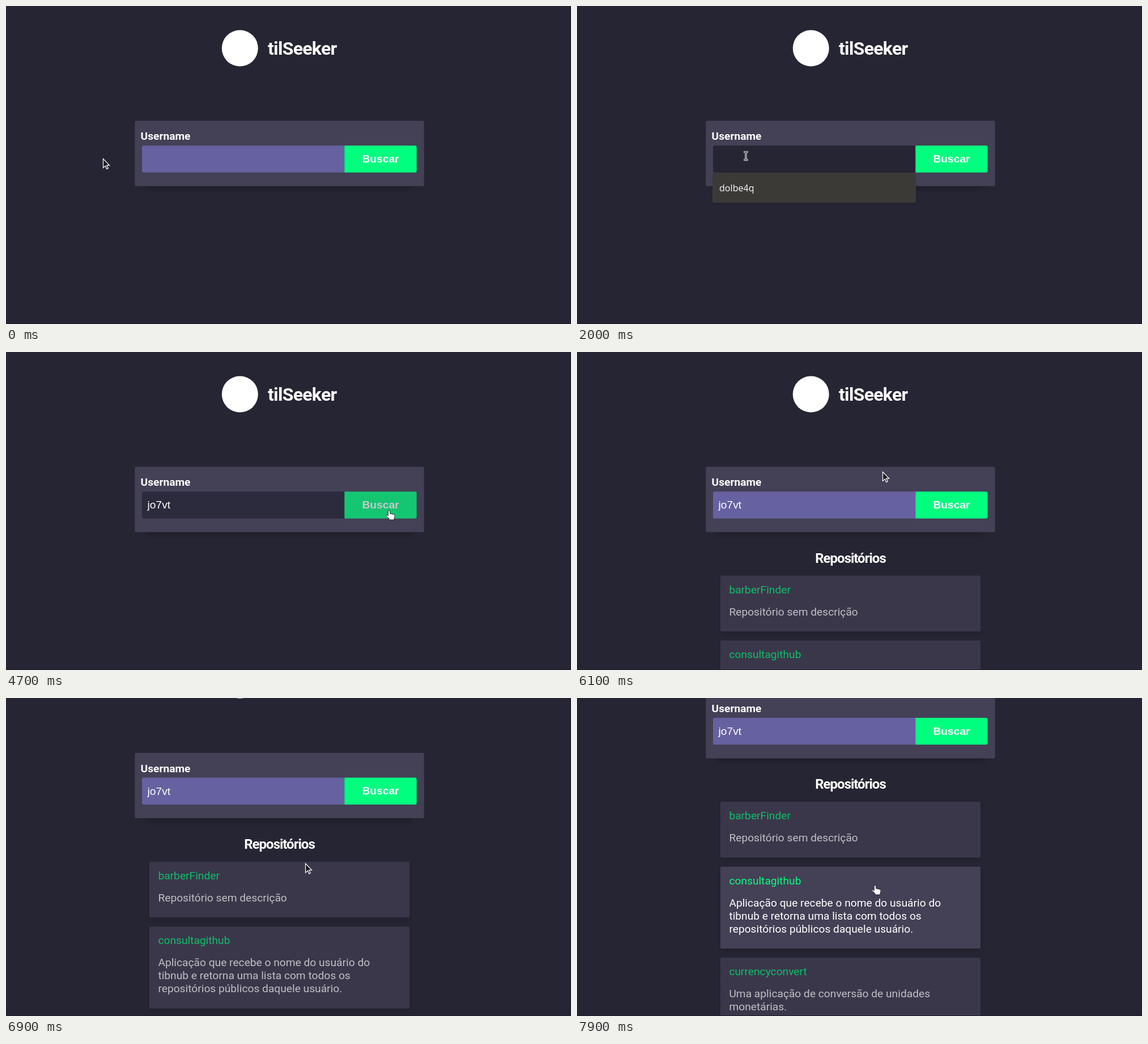
Animation, 997 px wide and 561 px high, one loop 8000 ms. Source, as an HTML page:

```html
<!DOCTYPE html>
<html lang="pt-BR">
<head>
<meta charset="utf-8">
<title>Busca de repositórios</title>
<style>
  html, body { margin: 0; width: 100%; height: 100%; overflow: hidden; background: #262533; }
  svg { display: block; width: 997px; height: 561px; }
  text { fill: #fff; font: 19.2px Roboto, sans-serif; white-space: pre; }
  .brand { font-size: 32px; font-weight: 700; letter-spacing: -.7px; }
  .heading { font-size: 24px; font-weight: 700; letter-spacing: -1px; text-anchor: middle; }
  .label { font-weight: 700; }
  .field { font-family: "Liberation Sans", Arial, sans-serif; }
  .button { font-family: "Liberation Sans", Arial, sans-serif; font-weight: 700; text-anchor: middle; }
  .option { font: 16px "Noto Sans", sans-serif; fill: #eee; }
  .name { fill: #00ff7f; }
  .panel { fill: #444056; }
  .shadow { fill: #000; filter: blur(5px); }
</style>
</head>
<body>
<svg viewBox="0 0 997 561">
  <rect width="997" height="561" fill="#262533"/>
  <g id="page">
    <circle cx="412.8" cy="74.5" r="32" fill="#fff"/>
    <text class="brand" x="462" y="86">tilSeeker</text>

    <rect class="shadow" x="248" y="300" width="469" height="23" opacity=".22"/>
    <rect class="panel" x="227.3" y="202.5" width="510.4" height="115.3" rx="2.5"/>
    <text class="label" x="237.6" y="236.3">Username</text>
    <path id="input" d="M597.3 246.3H243q-3 0-3 3v41.4q0 3 3 3H597.3Z"/>
    <text id="typed" class="field" x="249.6" y="276.3"></text>
    <g id="button">
      <path d="M597.3 246.3h124.3q3 0 3 3v41.4q0 3-3 3H597.3Z" fill="#00ff7f"/>
      <text class="button" x="661" y="276">Buscar</text>
    </g>

    <g id="results">
      <text class="heading" x="482.5" y="371.5">Repositórios</text>
    </g>
  </g>

  <g id="dropdown">
    <rect class="shadow" x="243" y="300" width="351" height="46" opacity=".15"/>
    <path d="M239 294H598v49q0 4-4 4H243q-4 0-4-4Z" fill="#3b3a37"/>
    <text class="option" x="251" y="326.5">dolbe4q</text>
  </g>

  <path d="M0 560.5H996.5V0" fill="none" stroke="#1b1a25"/>

  <g id="cursor">
    <path id="arrow" d="M.5 .5V16.6L4.3 13.1L6.8 18.6L9.2 17.5L6.8 12.1H11.6Z"
          fill="#1c1b22" stroke="#fff" stroke-width="1.2"/>
    <g id="beam" fill="none">
      <path id="stem" d="M-4-6.5H-1.5L0-5.5L1.5-6.5H4M0-6V7M-4 7.5H-1.5L0 6.5L1.5 7.5H4" stroke="#fff" stroke-width="3"/>
      <path d="M-4-6.5H4M0-6V7M-4 7.5H4" stroke="#1c1b22"/>
    </g>
    <path id="hand" d="M-1.7 1.5Q-1.7 0 0 0T1.7 1.5V5.5L8 7Q10.3 7.7 10.2 10L9 14V16.5H0V14.5L-5.3 9.5Q-5.6 7.3-3.5 7.8L-1.7 9.3Z"
          fill="#fff" stroke="#1c1b22" stroke-width=".9"/>
  </g>
</svg>
<script>
const DURATION = 8000;
const STEP = 100;
const USER = "jo7vt";
const NOTCH = 105.7;
const DIMMED = .7;
const IDLE_FILL = [102, 97, 161];
const FOCUS_FILL = [38, 37, 51];

const REPOS = [
  ["barberFinder", "Repositório sem descrição"],
  ["consultagithub", "Aplicação que recebe o nome do usuário do",
    "tibnub e retorna uma lista com todos os", "repositórios públicos daquele usuário."],
  ["currencyconvert", "Uma aplicação de conversão de unidades", "monetárias."]
];

const HOME = { x: 171, y: 269 };
const MOVES = [
  { at: 500, lasts: 500, x: 298, y: 264 },
  { at: 4400, lasts: 300, x: 676, y: 279.5 },
  { at: 5100, lasts: 200, x: 539, y: 211 },
  { at: 6100, lasts: 400, x: 528, y: 291.5 },
  { at: 7100, lasts: 300, x: 526, y: 323 },
  { at: 7700, lasts: 200, x: 526, y: 330.5 }
];

const $ = id => document.getElementById(id);
const ramp = (time, at, lasts) => Math.min(1, Math.max(0, (time - at) / lasts));
const pulse = (time, on, off, lasts) => ramp(time, on, lasts) - ramp(time, off, lasts);
const easeIn = p => p ** 1.3;
const easeOut = p => 1 - (1 - p) ** 2;
const mix = (a, b, p) => a + (b - a) * p;
const show = (id, visible) => $(id).style.display = visible ? "" : "none";

function add(parent, tag, attrs, text = "") {
  const node = document.createElementNS("http://www.w3.org/2000/svg", tag);
  for (const key in attrs) node.setAttribute(key, attrs[key]);
  node.textContent = text;
  return parent.appendChild(node);
}

let cardTop = 394.5;
const cards = REPOS.map(([name, ...lines]) => {
  const height = 75.5 + 23 * lines.length;
  const card = add($("results"), "g", {});
  add(card, "rect", { class: "shadow", x: 256, y: cardTop + 6, width: 453, height: height - 4, opacity: .25 });
  add(card, "rect", { class: "panel", x: 253, y: cardTop, width: 459, height, rx: 2.5 });
  add(card, "text", { class: "name", x: 268.4, y: cardTop + 31 }, name);
  lines.forEach((line, i) => add(card, "text", { x: 268.4, y: cardTop + 70 + 23 * i }, line));
  cardTop += height + 16;
  return card;
});

function cursorAt(time) {
  return MOVES.reduce((from, to) => {
    const p = easeOut(ramp(time, to.at, to.lasts));
    return { x: mix(from.x, to.x, p), y: mix(from.y, to.y, p) };
  }, HOME);
}

function cursorShape(time) {
  if (time >= 2100 && time < 4300) return "hidden";
  if (time >= 800 && time < 4600) return "beam";
  if (time >= 4600 && time < 5200 || time >= 7200) return "hand";
  return "arrow";
}

// Steady typing with one pause after the third key
function typedCount(time) {
  const elapsed = time - 2100;
  const keys = Math.floor(elapsed / 300) + 1;
  return Math.max(0, keys <= 3 ? keys : Math.max(3, Math.floor((elapsed - 400) / 300) + 1));
}

function render(time) {
  const { x, y } = cursorAt(time);
  const shape = cursorShape(time);
  $("cursor").setAttribute("transform", `translate(${x} ${y})`);
  for (const id of ["arrow", "beam", "hand"]) show(id, id === shape);

  const scroll = NOTCH * (easeIn(ramp(time, 6300, 600)) + easeIn(ramp(time, 7500, 400)));
  $("page").setAttribute("transform", `translate(0 ${-scroll})`);

  const focus = pulse(time, 800, 4680, 220);
  $("input").setAttribute("fill", `rgb(${IDLE_FILL.map((v, i) => mix(v, FOCUS_FILL[i], focus))})`);
  $("typed").textContent = USER.slice(0, typedCount(time));
  $("dropdown").setAttribute("opacity", ramp(time, 1000, 100) - ramp(time, 2000, 200));
  $("button").setAttribute("opacity", mix(1, DIMMED, pulse(time, 4500, 5100, 100)));

  show("results", time >= 5100);
  const hovers = [pulse(time, 7100, 7700, 200), ramp(time, 7700, 200), 0];
  cards.forEach((card, i) => card.setAttribute("opacity", mix(DIMMED, 1, hovers[i])));
}

const start = performance.now();
function tick() {
  const time = (performance.now() - start) % DURATION;
  render(Math.floor(time / STEP) * STEP);
  requestAnimationFrame(tick);
}
tick();
</script>
</body>
</html>
```
